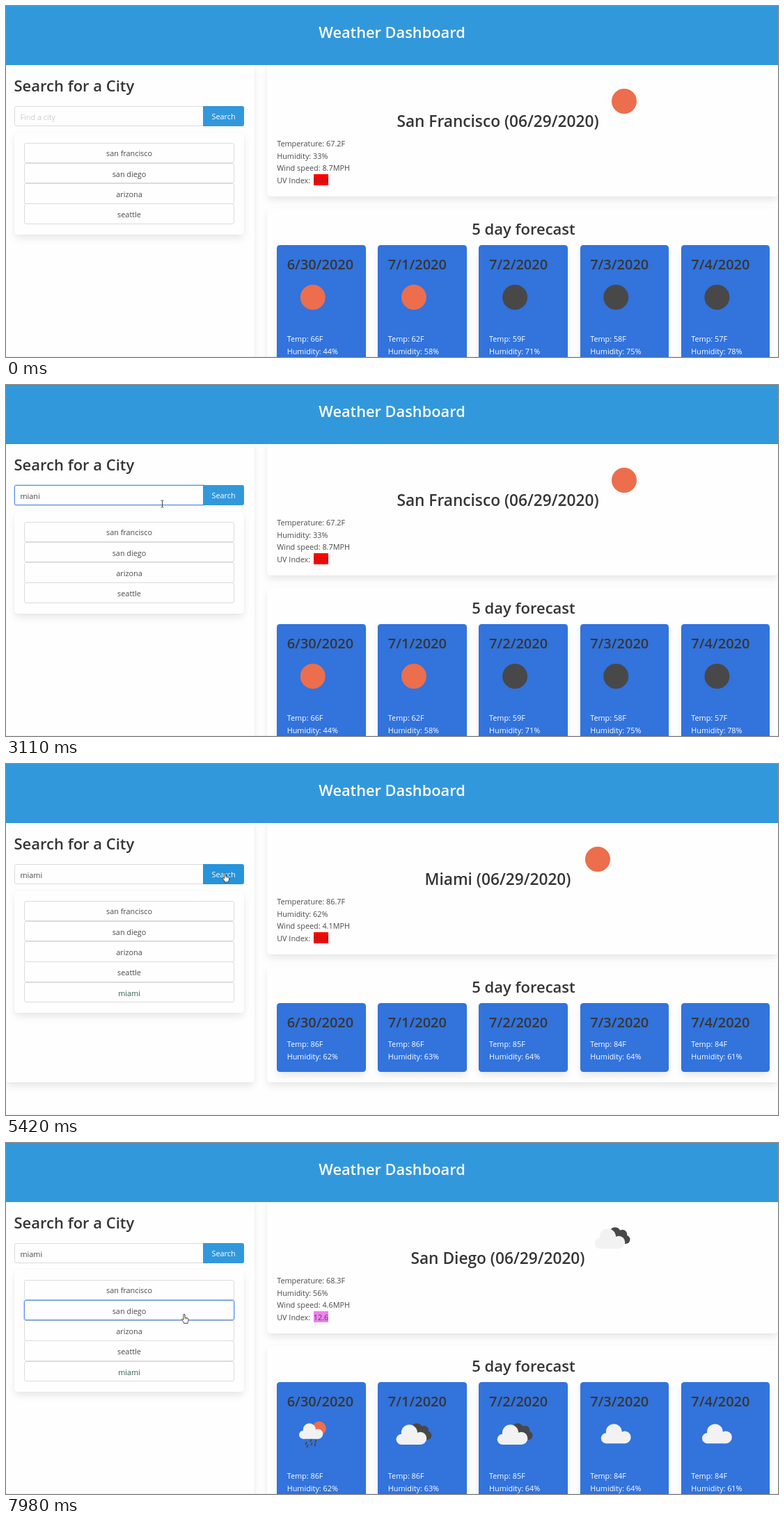
Write an HTML page that moves like this. It is 1109 px wide and 505 px high and loops after 8000 ms.

```html
<!DOCTYPE html>
<html lang="en">
<head>
<meta charset="utf-8">
<title>Weather Dashboard</title>
<style>
  html, body { margin: 0; width: 100%; height: 100%; overflow: hidden; background: #fefefe; }
  #stage { position: relative; width: 1109px; height: 505px; overflow: hidden; }
  #stage div, svg { position: absolute; box-sizing: border-box; }
  .box { border-radius: 4.4px; background: #fefefe;
    box-shadow: 0 5.9px 11.7px -1.5px rgba(10,10,10,.1), 0 0 0 .7px rgba(10,10,10,.02); }
  .tall { height: 460px; }
  .short .tall { height: 378px; }
  .forecast { height: 240px; }
  .short .forecast { height: 167px; }
  .card { background: #3273dc; top: 344px; width: 127.6px; height: 172px; }
  .short .card { height: 99px; }
  .item, #field { border: 1px solid #dbdbdb; border-radius: 2.9px; background: #fefefe; }
  .item { left: 26px; width: 302px; height: 29.5px; }
  .item.hover { border-color: #b5b5b5; }
  .item.active { border-color: #4a4a4a; }
  .item.focus, #field.focus { border-color: #5c8fe3; box-shadow: 0 0 0 1px rgba(50,115,220,.28); z-index: 1; }
  #field { left: 12px; top: 144px; width: 272px; height: 29px; border-radius: 2.9px 0 0 2.9px; }
  #button { left: 283px; top: 144px; width: 59px; height: 29px; background: #3298dc; border-radius: 0 2.9px 2.9px 0; z-index: 2; }
  #button.hover { background: #2793da; }
  #nav { left: 0; top: 0; width: 1109px; height: 85px; background: #3298dc; }
  svg { left: 0; top: 0; z-index: 3; }
  text { font: 10.85px "Open Sans", "Noto Sans", sans-serif; fill: #4a4a4a; white-space: pre; }
  text.h { font-size: 22px; font-weight: 600; fill: #363636; }
  text.title { font-size: 21.8px; }
  text.city { font-size: 22.7px; }
  text.day { font-size: 20px; }
  text.w { fill: #fff; }
  .mid { text-anchor: middle; }
</style>
</head>
<body>
<div id="stage"></div>
<script>
const LOOP = 8000, PITCH = 29.3, CARD_X = 389.1, CARD_STEP = 145.15;
const stage = document.getElementById('stage');
const $ = id => document.getElementById(id);
const text = (x, y, s, cls = '', id = '') => `<text x="${x}" y="${y}" class="${cls}" id="${id}">${s}</text>`;
const box = (x, y, w, cls, h) =>
  `<div class="box ${cls}" style="left:${x}px;top:${y}px;width:${w}px;${h ? `height:${h}px` : ''}"></div>`;
const disc = (x, y, r, fill) => `<circle cx="${x}" cy="${y}" r="${r}" fill="${fill}"/>`;
const range = n => [...Array(n).keys()];
const cardX = i => CARD_X + i * CARD_STEP;

const SUN = '#ec6e4c', DARK = '#484848', PALE = '#f2f2f2';
const cloud = (x, y, k) => `<g transform="translate(${x} ${y}) scale(${k})" fill="${PALE}">
  <circle cx="-14" cy="6.2" r="7.5"/><circle cx="-3" cy="-3" r="11.4"/><circle cx="12.5" cy="4.8" r="8.9"/>
  <path d="M-14 4H12.5V13.7H-14Z"/></g>`;
const drops = [[-10, 13], [-3, 9], [4, 10], [-8, 17], [-2, 14], [3, 15]]
  .map(([x, y]) => `<path d="M${x + .8} ${y - 1.3}l-1.3 2.8" stroke="${DARK}" stroke-width="1.8" stroke-linecap="round"/>`).join('');
const ICONS = {
  sun: disc(0, 0, 18, SUN),
  moon: disc(0, 0, 18, DARK),
  cloud: cloud(0, -.4, 1),
  clouds: disc(4, -7.5, 8.3, DARK) + disc(14.5, -5.5, 6.8, DARK) + disc(19.3, 1.8, 6.2, DARK) +
    `<path d="M4 -6H16L20 8H4Z" fill="${DARK}"/>` + cloud(-3.5, 1, 1.02),
  shower: disc(9, -8.5, 10, SUN) + cloud(-2.6, -4.2, .8) + drops
};
const icon = (name, x, y) => `<g transform="translate(${x} ${y})">${ICONS[name]}</g>`;

const CITIES = {
  sf: { name: 'San Francisco', now: ['67.2', 33, '8.7'], icon: 'sun', iconX: 888 },
  miami: { name: 'Miami', now: ['86.7', 62, '4.1'], icon: 'sun', iconX: 850 },
  sd: { name: 'San Diego', now: ['68.3', 56, '4.6'], icon: 'clouds', iconX: 871 }
};
const DAYS = {
  sf: { temp: [66, 62, 59, 58, 57], hum: [44, 58, 71, 75, 78], icons: ['sun', 'sun', 'moon', 'moon', 'moon'] },
  miami: { temp: [86, 86, 85, 84, 84], hum: [62, 63, 64, 64, 61], icons: ['shower', 'clouds', 'clouds', 'cloud', 'cloud'] }
};
const POINTERS = {
  none: '',
  arrow: '<path d="M0 0V11.6L2.7 9.2L4.4 13L6.1 12.2L4.4 8.6H8.2Z" fill="#fff" stroke="#222" stroke-width=".8"/>',
  beam: '<path d="M-2 -5H-.6L0 -4.4L.6 -5H2M0 -4.4V4.4M-2 5H-.6L0 4.4L.6 5H2" fill="none" stroke="#444" stroke-width="1"/>',
  hand: `<path d="M-1 .8Q0 -.7 1 .8V5L2.5 5.2L4 5.7L5.4 6.3Q6 6.6 6 7.6V9.5Q6 11 5 12V13.4H-.6V12.2
    L-3.4 8.2Q-3.6 7 -2.4 7L-1 8.3Z" fill="#fff" stroke="#333" stroke-width=".9" stroke-linejoin="round"/>
    <path d="M1.3 5V7.4M2.8 5.4V7.6M4.3 6V7.8" stroke="#555" stroke-width=".6"/>`
};

// Each step changes part of the state from its time on.
const at = (kind, x, y, more) => ({ kind, x, y, ...more });
const START = { kind: 'none', x: 0, y: 0, hover: -1, active: -1, focus: -1, field: false, button: false, caret: false,
  typed: '', squiggle: false, glow: false, short: false, city: 'sf', days: 'sf', uv: 'sf', items: 4 };
const STEPS = [
  [230, at('arrow', 972, 488)],
  [310, at('arrow', 338, 296)],
  [400, { kind: 'none' }],
  [760, at('arrow', 290, 326)],
  [840, at('hand', 284, 300, { hover: 3 })],
  [910, at('hand', 272, 268, { hover: 2 })],
  [990, at('hand', 258, 236, { hover: 1 })],
  [1070, at('hand', 244, 210, { hover: 0 })],
  [1140, at('arrow', 234, 186, { hover: -1 })],
  [1220, at('beam', 226, 173)],
  [1300, at('beam', 224.5, 172, { glow: true, field: true })],
  [1390, { caret: true }],
  [1480, { glow: false }],
  [1700, { y: 171 }],
  [1930, { caret: false }],
  [2080, { typed: 'm', caret: true }],
  [2250, { typed: 'mi' }],
  [2320, { typed: 'mia' }],
  [2490, { typed: 'mian' }],
  [2560, { typed: 'miani' }],
  [3110, { caret: false }],
  [3190, { typed: 'mian', caret: true }],
  [3270, { typed: 'mia' }],
  [3650, { typed: 'miam' }],
  [3730, { typed: 'miami' }],
  [4270, { caret: false }],
  [4500, at('beam', 245, 168)],
  [4580, at('beam', 274, 162, { squiggle: true })],
  [4660, at('hand', 305, 157, { button: true })],
  [4730, at('arrow', 343, 156, { button: false })],
  [4810, at('arrow', 345, 156, { caret: true })],
  [4960, at('hand', 314.5, 156.5, { button: true })],
  [5190, { glow: true, field: false, caret: false, squiggle: false }],
  [5340, { glow: false, city: 'miami', days: 'miami', items: 5, short: true }],
  [5500, { short: false }],
  [5570, { uv: 'miami' }],
  [6510, at('arrow', 300, 176, { button: false })],
  [6590, at('hand', 283, 203, { hover: 0 })],
  [6660, at('hand', 272, 209)],
  [6890, at('hand', 270, 212)],
  [6970, at('hand', 266, 221)],
  [7040, at('hand', 264, 225.5)],
  [7120, at('hand', 260, 237, { hover: 1 })],
  [7200, at('hand', 256, 246)],
  [7750, { active: 1 }],
  [7820, { active: -1, focus: 1 }],
  [7980, { city: 'sd' }]
];

const wave = 'M21 166.3' + range(15).map(i => `l1 ${i % 2 ? 1.2 : -1.2}l1 ${i % 2 ? -1.2 : 1.2}`).join('');
const names = ['san francisco', 'san diego', 'arizona', 'seattle', 'miami'];
const dates = ['6/30/2020', '7/1/2020', '7/2/2020', '7/3/2020', '7/4/2020'];

stage.innerHTML =
  box(0, 80, 357, 'tall') + box(375, 80, 734, '', 193.5) + box(375, 291, 734, 'forecast') +
  range(5).map(i => box(cardX(i), 344, 127.6, 'card')).join('') +
  '<div class="box" id="history" style="left:12px;top:182px;width:330px"></div>' +
  range(5).map(i => `<div class="item" id="item${i}" style="top:${196.5 + i * PITCH}px"></div>`).join('') +
  '<div id="field"></div><div id="button"></div><div id="nav"></div>' +
  `<svg width="1109" height="505" viewBox="0 0 1109 505">
    <path d="M0 504.5H1109" stroke="rgba(0,0,0,.06)"/>
    <defs><radialGradient id="halo"><stop offset=".6" stop-color="#fff22e" stop-opacity=".75"/>
    <stop offset="1" stop-color="#fff22e" stop-opacity=".45"/></radialGradient></defs>` +
  text(554.5, 46, 'Weather Dashboard', 'h title w mid') +
  text(11.5, 122.5, 'Search for a City', 'h') +
  text(743.5, 329, '5 day forecast', 'h mid') +
  text(312.5, 163, 'Search', 'w mid') +
  text(20.5, 163.6, '', '', 'typed') +
  `<path id="squiggle" d="${wave}" fill="none" stroke="#e0302a" stroke-width=".8"/>
   <path id="caret" stroke="#333" stroke-width="1"/>` +
  names.map((s, i) => text(177, Math.round(216.3 + i * PITCH), s, 'mid', 'name' + i)).join('') +
  dates.map((s, i) => text(cardX(i) + 14.6, 378.5, s, 'h day')).join('') +
  `<g id="city"></g><g id="uv"></g><g id="days"></g>
   <circle id="glow" r="8.7" fill="url(#halo)"/><g id="pointer"></g></svg>`;
$('name4').style.fill = '#2f5d50';

const show = (id, on) => { $(id).style.display = on ? '' : 'none'; };

function cityView(c) {
  const [temp, hum, wind] = c.now;
  return text(706.5, 173.5, `${c.name} (06/29/2020)`, 'h city mid') + icon(c.icon, c.iconX, 137) +
    [`Temperature: ${temp}F`, `Humidity: ${hum}%`, `Wind speed: ${wind}MPH`, 'UV Index:']
      .map((s, i) => text(389.2, 202 + i * 17.6, s)).join('');
}

function daysView(d, short) {
  return range(5).map(i => {
    const x = cardX(i), y = short ? 407 : 483;
    return (short ? '' : icon(d.icons[i], x + 51.7, 419)) +
      text(x + 14.6, y, `Temp: ${d.temp[i]}F`, 'w') + text(x + 14.6, y + 17.6, `Humidity: ${d.hum[i]}%`, 'w');
  }).join('');
}

function draw(s) {
  stage.className = s.short ? 'short' : '';
  $('history').style.height = (s.items === 5 ? 176 : 146.7) + 'px';
  show('item4', s.items === 5);
  show('name4', s.items === 5);
  range(5).forEach(i => {
    $('item' + i).className = 'item' + ['hover', 'active', 'focus'].map(k => s[k] === i ? ' ' + k : '').join('');
  });
  $('field').className = s.field ? 'focus' : '';
  $('button').className = s.button ? 'hover' : '';

  const typed = $('typed');
  typed.textContent = s.typed || 'Find a city';
  typed.style.fill = s.typed ? '' : '#cdcdcd';
  const end = s.typed ? Math.round(typed.getComputedTextLength()) : 0;
  $('caret').setAttribute('d', `M${20.5 + end} 151V167`);
  show('caret', s.caret);
  show('squiggle', s.squiggle);

  $('city').innerHTML = cityView(CITIES[s.city]);
  const hot = s.uv === 'sf';
  $('uv').innerHTML = `<path d="M442 242H463V258H442Z" fill="${hot ? '#f00' : '#ee82ee'}"/>` +
    `<g opacity="${hot ? .6 : 1}">${text(452.5, 254.8, hot ? '9.64' : '12.6', 'mid')}</g>`;
  $('days').innerHTML = daysView(DAYS[s.days], s.short);

  const dy = s.kind === 'hand' ? 6 : 0;
  $('glow').setAttribute('cx', s.x - 1);
  $('glow').setAttribute('cy', s.y + dy);
  show('glow', s.glow);
  $('pointer').setAttribute('transform', `translate(${s.x} ${s.y})`);
  $('pointer').innerHTML = POINTERS[s.kind];
}

let last = -1;
const begin = performance.now();
function tick() {
  const t = (performance.now() - begin) % LOOP;
  const count = STEPS.filter(([time]) => time <= t).length;
  if (count !== last) {
    draw(Object.assign({}, START, ...STEPS.slice(0, count).map(step => step[1])));
    last = count;
  }
  requestAnimationFrame(tick);
}
tick();
</script>
</body>
</html>
```
